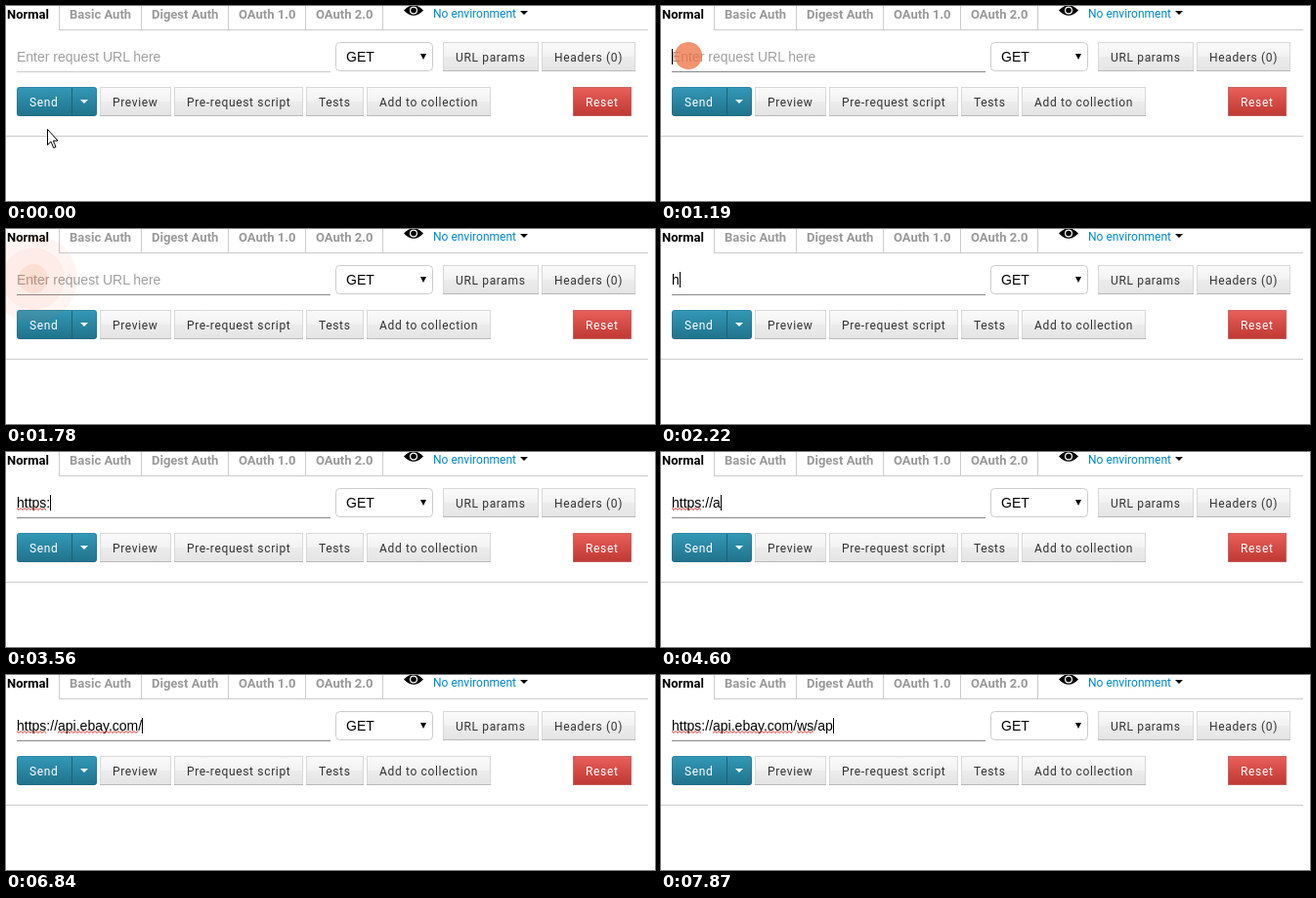
An HTML page for the animation above (8 s loop, 664 px wide and 200 px high).

```html
<!DOCTYPE html>
<html lang="en">
<head>
<meta charset="utf-8">
<title>Request form</title>
<style>
  html, body { margin: 0; width: 664px; height: 200px; overflow: hidden; background: #fff; }
  svg { display: block; }
  .tab { font: bold 13px Roboto, sans-serif; fill: #999; }
  .tab.on { fill: #000; }
  .env { font: 12px Roboto, sans-serif; fill: #08c; }
  .field { font: 14px "Liberation Sans", Arial, sans-serif; white-space: pre; }
  .label { font: 12px Roboto, sans-serif; letter-spacing: .66px; fill: #333; }
  .label.light { fill: #fff; }
  .rule { fill: #ccc; }
  #line { fill: #ccc; }
  #line.focus { fill: #888; }
</style>
</head>
<body>
<svg id="stage" width="664" height="200" viewBox="0 0 664 200">
  <defs>
    <linearGradient id="plain" x2="0" y2="1">
      <stop stop-color="#fafafa"/><stop offset=".5" stop-color="#f2f2f2"/>
      <stop offset=".5" stop-color="#ececec"/><stop offset="1" stop-color="#e4e4e4"/>
    </linearGradient>
    <linearGradient id="blue" x2="0" y2="1"><stop stop-color="#3399b7"/><stop offset="1" stop-color="#20728b"/></linearGradient>
    <linearGradient id="red" x2="0" y2="1"><stop stop-color="#ea5f5b"/><stop offset="1" stop-color="#bf3832"/></linearGradient>
    <pattern id="wave" width="4" height="3" y="57" patternUnits="userSpaceOnUse">
      <path d="M-1 .5L1 2.5L3 .5L5 2.5" fill="none" stroke="#e02020"/>
    </pattern>
  </defs>

  <!-- tabs -->
  <g id="tabs"><text class="tab on" x="1" y="13">Normal</text></g>
  <rect class="rule" x="54" y="24" width="603" height="1"/>
  <path d="M407 4.500Q417 -6 427 4.500Q417 15 407 4.500Z"/>
  <circle cx="417" cy="4.500" r="4" fill="#fff"/>
  <circle cx="417" cy="4.500" r="2.800"/>
  <text class="env" x="437" y="12">No environment</text>
  <path d="M526 5h8l-4 4z"/>

  <!-- address field -->
  <text id="hint" class="field" x="11" y="57" fill="#a0a0a0">Enter request URL here</text>
  <text id="url" class="field" x="11" y="57"></text>
  <path id="marks" fill="url(#wave)"/>
  <rect id="caret" y="44" width="1" height="16"/>
  <rect id="line" x="11" y="67" width="321" height="1"/>
  <rect x="337.500" y="37.500" width="99" height="29" rx="4" fill="#fff" stroke="#ccc"/>
  <text class="field" x="348" y="57">GET</text>
  <path d="M424 49h6l-3 6z"/>

  <g id="buttons"></g>

  <!-- send and reset -->
  <rect x="11" y="83" width="82" height="30" rx="3" fill="url(#blue)"/>
  <rect x="11.500" y="83.500" width="81" height="29" rx="3" fill="none" stroke="#1b6177" stroke-opacity=".3"/>
  <rect x="67" y="84" width="1" height="28" fill="#1d6177"/>
  <text class="label light" x="24" y="103">Send</text>
  <path d="M76 96h8l-4 4z" fill="#fff"/>
  <rect x="580.500" y="83.500" width="59" height="29" fill="url(#red)" stroke="#b5352f" stroke-opacity=".6"/>
  <text class="label light" x="593" y="103">Reset</text>
  <rect class="rule" y="133" width="657" height="1"/>

  <g id="ripple" fill="#ee6f41">
    <circle cx="28" cy="51" fill-opacity=".2"/>
    <circle cx="28" cy="51" fill-opacity=".22"/>
    <circle id="disc" cx="28" cy="51"/>
    <circle cx="28" cy="51" fill-opacity=".65"/>
  </g>
  <path id="pointer" d="M.5 .5V16.500L4 13L6.700 19.500L9 18.500L6.300 12.200H11Z" fill="#fff" stroke="#000"/>
</svg>

<script>
const LOOP = 8000;
const TICK = 148.3;
const PRESS = 6, FOCUS = 7, RELEASE = 9, FADE = 10, TYPE = 15;
// Keys pressed in each tick, with empty ticks as pauses
const KEYS = "h||t|t||p||s||:||/|/||||a|p||i||.|e|b||a|y|.|co|m||/||w|s||/|a|p".split("|");

const $ = id => document.getElementById(id);
const show = (el, on) => el.setAttribute("visibility", on ? "visible" : "hidden");

function add(parent, tag, attrs, text = "") {
  const el = document.createElementNS("http://www.w3.org/2000/svg", tag);
  for (const key in attrs) el.setAttribute(key, attrs[key]);
  el.textContent = text;
  parent.append(el);
  return el;
}

function layTabs(x, names) {
  for (const name of names) {
    add($("tabs"), "rect", { class: "rule", x, y: 0, width: 1, height: 24 });
    const label = add($("tabs"), "text", { class: "tab", x: x + 11, y: 13 }, name);
    x += Math.round(label.getComputedTextLength()) + 21;
  }
  add($("tabs"), "rect", { class: "rule", x, y: 0, width: 1, height: 24 });
}

function layButtons(x, y, names) {
  const g = $("buttons");
  for (const name of names) {
    const label = add(g, "text", { class: "label", x: x + 13, y: y + 20 }, name);
    const width = Math.round(label.getComputedTextLength()) + 26;
    add(g, "rect", { x: x + .5, y: y + .5, width: width - 1, height: 29, fill: "url(#plain)", stroke: "#d8d8d8" });
    add(g, "rect", { x, y: y + 29, width, height: 1, fill: "#b8b8b8" });
    g.append(label);
    x += width + 3;
  }
}

function drawField(tick) {
  const text = KEYS.slice(0, Math.max(0, tick - TYPE + 1)).join("");
  const url = $("url");
  url.textContent = text;
  const edge = n => 11 + (n ? Math.round(url.getSubStringLength(0, n)) : 0);

  // A word is marked as misspelt once the next separator follows it.
  const words = [...text.matchAll(/[\w.]+(?=\W)/g)];
  $("marks").setAttribute("d", words.map(({ 0: word, index }) =>
    `M${edge(index)} 57H${edge(index + word.length)}v3H${edge(index)}z`).join(""));

  show($("hint"), !text);
  $("line").classList.toggle("focus", tick >= FOCUS);
  $("caret").setAttribute("x", edge(text.length));
  show($("caret"), tick >= TYPE - 1 || (tick >= FOCUS && tick < FOCUS + 4));
}

function drawPointer(tick) {
  const p = Math.max(0, tick - 1) / 2;
  $("pointer").setAttribute("transform", `translate(${42 - 31 * p} ${126 - 75 * p})`);
  show($("pointer"), p <= 1);
}

// A disc grows while pressed; on release two rings spread, then all fades.
function drawRipple(tick) {
  const age = tick - PRESS;
  const held = tick < RELEASE;
  const outer = held ? 0 : Math.min(45, 13 * age - 12);
  const radii = [outer, Math.max(0, outer - 13), Math.min(15, 9 + 2.5 * age), held ? 0 : 4.5];
  const fade = Math.min(1, 1 - (tick - FADE) / 3);
  const on = age >= 0 && fade > 0;
  show($("ripple"), on);
  if (!on) return;
  [...$("ripple").children].forEach((circle, i) => circle.setAttribute("r", radii[i]));
  $("disc").setAttribute("fill-opacity", held ? .75 : .45);
  $("ripple").setAttribute("opacity", fade);
}

layTabs(54, ["Basic Auth", "Digest Auth", "OAuth 1.0", "OAuth 2.0"]);
layButtons(447, 37, ["URL params", "Headers (0)"]);
layButtons(96, 83, ["Preview", "Pre-request script", "Tests", "Add to collection"]);

const start = performance.now();
function frame() {
  const t = (performance.now() - start) % LOOP;
  const tick = Math.floor((t + 10) / TICK);
  drawField(tick);
  drawPointer(tick);
  drawRipple(tick);
  requestAnimationFrame(frame);
}
frame();
</script>
</body>
</html>
```
